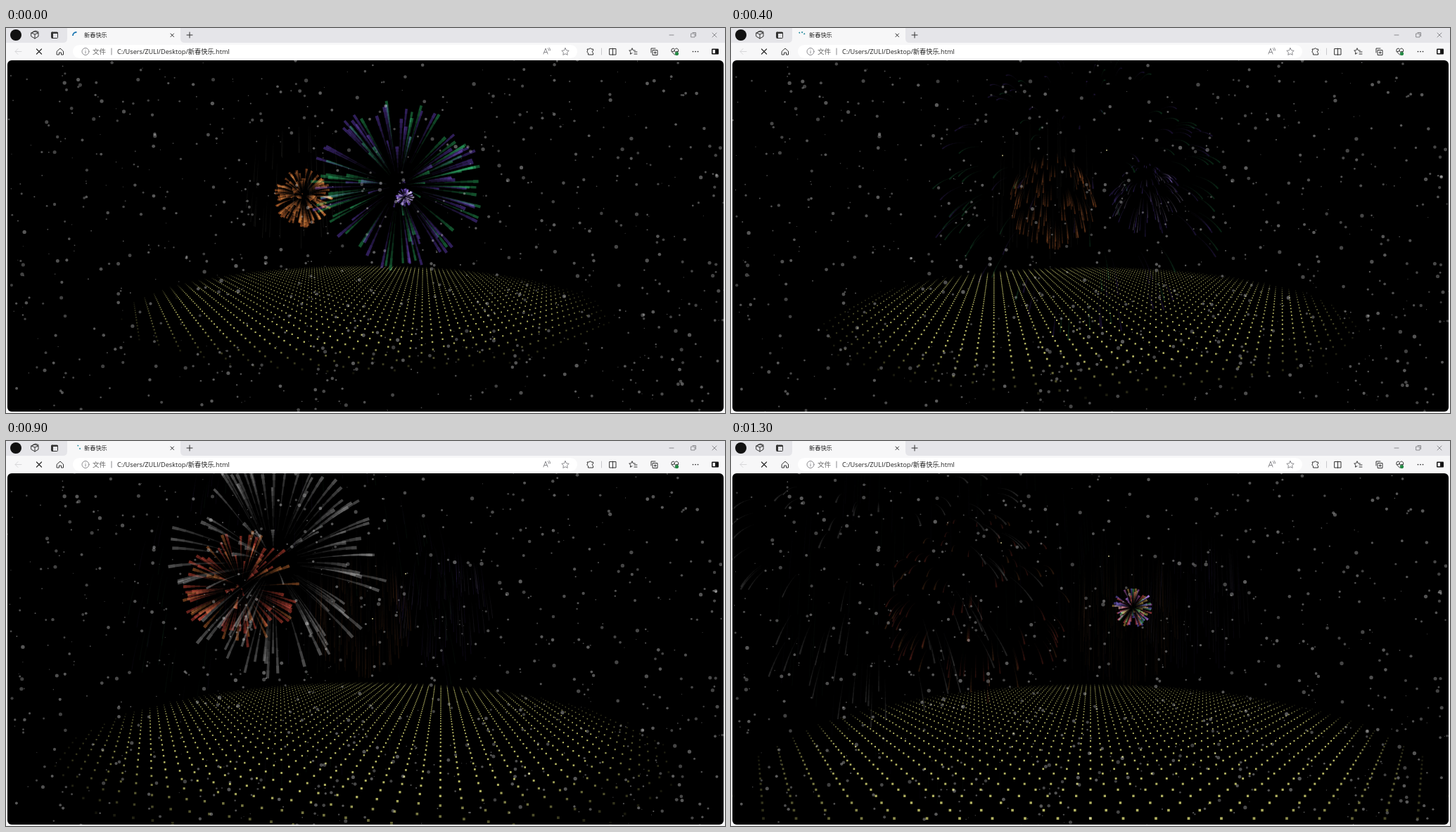
An HTML page with a canvas for the animation above (1350 ms loop, 1022 px wide and 548 px high).

```html
<!DOCTYPE html>
<html lang="zh">
<head>
<meta charset="utf-8">
<style>
  html, body { margin: 0; width: 1022px; height: 548px; overflow: hidden; background: #f7f7f8; }
  canvas, svg { position: absolute; left: 0; top: 0; display: block; }
  text { font-family: "Open Sans", "Noto Sans CJK SC", "Noto Sans CJK", sans-serif; fill: #222; }
  .icon { fill: none; stroke: #333; stroke-width: 1; stroke-linecap: round; stroke-linejoin: round; }
  .dim { stroke: #8a8a8e; }
</style>
</head>
<body>
<canvas id="stage" width="1022" height="548"></canvas>
<svg width="1022" height="548" viewBox="0 0 1022 548">
  <path fill="#e5e5e9" d="M0 0H1022V21H254Q248 21 248 15V0H87V15Q87 21 81 21H0Z"/>
  <rect x="95" y="24" width="717" height="19" rx="9.5" fill="#fff"/>
  <circle cx="14" cy="10" r="8" fill="#111"/>
  <circle id="spinner" cx="100" cy="11" r="5" fill="none" stroke="#1673b0" stroke-width="1.8" pathLength="360"/>
  <text x="111" y="13" font-size="8.2">新春快乐</text>
  <text x="123" y="37" font-size="9.6" style="fill:#666">文件</text>
  <text x="158" y="37" font-size="9.2">C:/Users/ZULI/Desktop/新春快乐.html</text>
  <g class="icon">
    <path d="M36 7l5-2 5 2v5l-5 3-5-3zM38 5.500l4-1.500 4 1.500M41 9v6M36 7l5 2 5-2"/>
    <rect x="64.500" y="6" width="9" height="8.500" rx="1"/>
    <path d="M65 7h8M66 7v7" stroke-width="2"/>
    <path d="M234 8l4.500 4.500M238.500 8l-4.500 4.500M257 10h8M261 6v8"/>
    <path class="dim" d="M943 10h6M974 8h5v5h-5zM976 6.500h4.500v5M1004 7l6 6M1010 7l-6 6"/>
    <path stroke="#d8d8da" d="M22 33.500h-9l4-4M13 33.500l4 4"/>
    <path stroke-width="1.300" d="M43.500 30l7 7M50.500 30l-7 7"/>
    <path d="M72.500 33l4.500-4 4.500 4v5h-3v-3h-3v3h-3z"/>
    <circle class="dim" cx="113" cy="33.500" r="5"/>
    <path class="dim" d="M113 33v3M113 31v.1M150 29v9M764 37l3-8 3 8M765 34.500h4M770 29q2 1 1.500 3M772 28q2 2 1.500 4"/>
    <path stroke="#c8c8cc" d="M846.500 29v9"/>
    <path class="dim" d="M795 28.500l1.600 3.300 3.600.5-2.600 2.500.6 3.600-3.200-1.700-3.200 1.700.6-3.600-2.600-2.500 3.600-.5z"/>
    <path d="M826.500 30h2.500q1-3 3 0h2.500v2.500q-3 1 0 3v2.500h-7v-2.500q-3-1-1-3z"/>
    <path d="M858 29.500h9v8.500h-9zM862.500 29v9.500"/>
    <path d="M890 29l1.300 2.700 3 .4M890 29l-1.300 2.700-3 .4 2.200 2.100-.5 3 2.600-1.400M893 34h4M893 37h4"/>
    <path d="M917 35v-6h6M919.500 31.500h6.500v7h-6.500zM922.700 33.500v3M921.200 35h3"/>
    <path d="M950.500 38l-4.500-4.500q-1-4 2-4.500 2 0 2.500 1.700 1-1.700 3-1.700 3 1 2 4.500zM947 33.500h2l1-2 1.500 3 1-1h2"/>
  </g>
  <circle cx="953.500" cy="36.500" r="2.600" fill="#258a45"/>
  <path d="M976.500 33.500h.01M980 33.500h.01M983.500 33.500h.01" stroke="#222" stroke-width="1.700" stroke-linecap="round"/>
  <rect x="1003" y="29.500" width="10" height="8" rx="1" fill="#151515"/>
  <path d="M1004.500 31h3.500v5h-3.500z" fill="#f7f7f8"/>
</svg>
<script>
const ctx = document.getElementById('stage').getContext('2d');
const spinner = document.getElementById('spinner');
const LOOP = 1350, STEP = 50, TAU = Math.PI * 2, TAIL = 7;

let seed = 20240;
const rand = () => {
  seed = (seed + 0x6D2B79F5) | 0;
  let n = Math.imul(seed ^ (seed >>> 15), 1 | seed);
  n = (n + Math.imul(n ^ (n >>> 7), 61 | n)) ^ n;
  return ((n ^ (n >>> 14)) >>> 0) / 4294967296;
};
const make = (n, fn) => Array.from({ length: n }, fn);

// Linear interpolation through rows of [time, value, value...]
function track(keys, t, col = 1) {
  let i = 1;
  while (i < keys.length - 1 && keys[i][0] < t) i++;
  const a = keys[i - 1], b = keys[i];
  return a[col] + (b[col] - a[col]) * (t - a[0]) / (b[0] - a[0]);
}

// Camera angle in degrees
const turn = t => track([[0, -35.4], [300, -21], [500, -10.5], [700, 0],
                         [900, 12.5], [1000, 20.5], [1300, 45]], t);

const GREEN = '#1f8a4c', PURPLE = '#52349c';
// sweep: px per degree of camera turn; sink: px per ms; half: ms until half of the reach
const bursts = [
  { t0: -950, x: 410, y: 215, sweep: 1.7, sink: .03, reach: 85, half: 170, n: 40, w: 3, life: 600, colors: ['#88887a'] },
  { t0: -137, x: 558, y: 221, sweep: -3, sink: .04, reach: 275, half: 170, n: 120, w: 6.5, life: 500, colors: [GREEN, PURPLE] },
  { t0: -188, x: 422, y: 237, sweep: 1.75, sink: .03, reach: 80, half: 170, n: 120, w: 6, life: 600, colors: ['#d0682c', '#b8602c'] },
  { t0: -63, x: 567, y: 240, sweep: 1.15, sink: .012, reach: 95, half: 400, n: 80, w: 3.5, life: 600, colors: ['#5c3cb0', '#5c3cb0', '#a090b8'] },
  { t0: 625, x: 466, y: 182, sweep: -5.2, sink: 0, reach: 330, half: 300, n: 95, w: 9, life: 550, colors: ['#a0a0a0', '#8c8c8c'] },
  { t0: 780, x: 331, y: 200, sweep: .5, sink: .075, reach: 160, half: 110, n: 95, w: 6.5, life: 420, colors: ['#c04030', '#b03a30', '#b0602c'] },
  { t0: 1240, x: 565, y: 237, sweep: 1.2, sink: 0, reach: 100, half: 150, n: 85, w: 4.2, life: 600, colors: ['#b04040', '#309048', '#5444a8', '#a08038', '#904898'] },
];
for (const b of bursts) {
  b.sparks = make(b.n, () => {
    const z = rand() * 2 - 1, a = rand() * TAU, r = Math.sqrt(1 - z * z);
    const speed = .92 + rand() * .12;
    return { x: Math.cos(a) * r * speed, y: Math.sin(a) * r * speed, size: .75 + z * .25,
             color: b.colors[Math.floor(rand() * b.colors.length)] };
  });
}

const snow = make(880, () => ({
  x: 2 + rand() * 1018, y: 42 + rand() * 504, r: .5 + 2.2 * rand() ** 1.2,
  vx: rand() * 6 - 4, vy: rand() * 9, alpha: .24 + rand() * .12
}));

const rockets = [
  [[100, 597, 167], [300, 561, 171], [500, 507, 177], [600, 480, 179]],
  [[100, 430, 172], [300, 402, 177], [500, 370, 186], [750, 340, 204]],
  [[600, 592, 350], [700, 571, 317], [900, 521, 253], [1000, 477, 211], [1300, 384, 145]],
  [[600, 581, 232], [700, 577, 213], [900, 568, 189], [1000, 560, 176], [1300, 537, 164]],
];

function drawGround(t) {
  const a = turn(t) * Math.PI / 180, c = Math.cos(a), s = Math.sin(a);
  const distance = 1.72 - .26 * t / 1000;
  ctx.fillStyle = '#c6c66c';
  for (let i = -25; i <= 25; i++) for (let j = -25; j <= 25; j++) {
    const u = i * .04, v = j * .04, r = Math.hypot(u, v);
    if (r > 1) continue;
    const z = v * c - u * s + distance, size = Math.max(1.1, 2.2 / z);
    ctx.globalAlpha = .9 * Math.min(1, .1 + (1 - r) * 5);
    ctx.fillRect(511 + 485 * (u * c + v * s) / z - size / 2, 283 + 150 / z - size / 2, size, size);
  }
}

function drawBurst(b, t) {
  const age = t - b.t0;
  if (age <= 0) return;
  const cx = b.x + b.sweep * (turn(t) - turn(Math.max(0, b.t0)));
  const cy = b.y + b.sink * age;
  const alpha = .75 * Math.exp(-age / b.life), width = b.w * Math.exp(-age / 550);
  const step = Math.min(age * .8, 240) / TAIL;
  const past = make(TAIL + 1, (_, k) => {
    const then = age - k * step;
    return { r: b.reach * then / (then + b.half), lift: 1e-4 * (then * then - age * age) };
  });
  for (const p of b.sparks) {
    ctx.strokeStyle = p.color;
    for (let k = 0; k < TAIL; k++) {
      const fade = 1 - k / TAIL, from = past[k + 1], to = past[k];
      ctx.globalAlpha = alpha * fade;
      ctx.lineWidth = Math.max(.7, width * p.size * fade);
      ctx.beginPath();
      ctx.moveTo(cx + p.x * from.r, cy + p.y * from.r + from.lift);
      ctx.lineTo(cx + p.x * to.r, cy + p.y * to.r + to.lift);
      ctx.stroke();
    }
  }
}

function dot(x, y, r) {
  ctx.beginPath();
  ctx.arc(x, y, r, 0, TAU);
  ctx.fill();
}

function drawSpinner(t) {
  spinner.style.display = t < 1150 ? '' : 'none';
  spinner.setAttribute('stroke', t < 400 ? '#1673b0' : '#238a9c');
  spinner.setAttribute('stroke-dasharray', t < 400 ? '95 265' : t < 800 ? '20 25 20 25 20 250' : '20 40 20 280');
  spinner.setAttribute('transform', `rotate(${180 + t * .12} 100 11)`);
}

function draw(t) {
  ctx.globalAlpha = 1;
  ctx.clearRect(0, 0, 1022, 548);
  ctx.save();
  ctx.beginPath();
  ctx.roundRect(2, 46, 1018, 500, 6);
  ctx.clip();
  ctx.fillStyle = '#000';
  ctx.fillRect(0, 46, 1022, 502);
  drawGround(t);
  ctx.globalCompositeOperation = 'screen';
  for (const b of bursts) drawBurst(b, t);
  ctx.globalCompositeOperation = 'source-over';

  ctx.globalAlpha = .9;
  ctx.fillStyle = '#e6e0a0';
  for (const path of rockets) {
    if (t >= path[0][0] && t <= path[path.length - 1][0]) dot(track(path, t), track(path, t, 2), .9);
  }

  ctx.fillStyle = '#fff';
  for (const f of snow) {
    ctx.globalAlpha = f.alpha;
    dot(f.x + f.vx * t / LOOP, f.y + f.vy * t / LOOP, f.r);
  }
  ctx.restore();
  drawSpinner(t);
}

let shown = -1;
const start = performance.now();
function tick() {
  const t = Math.floor((performance.now() - start) % LOOP / STEP) * STEP;
  if (t !== shown) draw(shown = t);
  requestAnimationFrame(tick);
}
tick();
</script>
</body>
</html>
```
